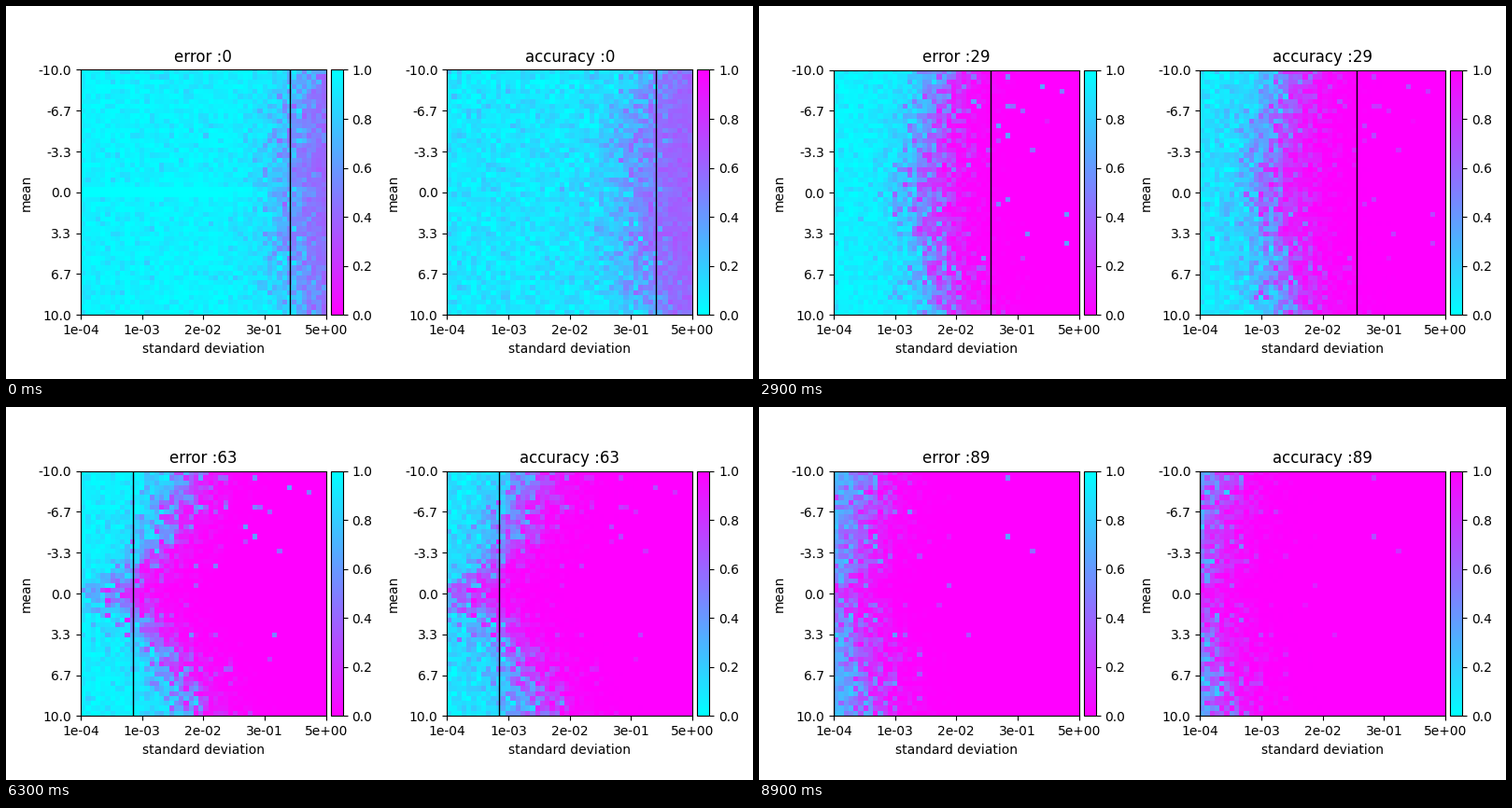
Animation of 800x400 px, one loop 9000 ms. Source, as a matplotlib script:

```python
import numpy as np
import matplotlib.pyplot as plt
from matplotlib.animation import FuncAnimation
from mpl_toolkits.axes_grid1 import make_axes_locatable

N = 50                # cells per side
EPOCHS = 90
STAGE = 10            # epochs per noise level
LOW, HIGH = 1e-4, 5.0
MARGINS = dict(left=.125, right=.9, bottom=.11, top=.88, wspace=.2)

plt.rcParams["font.family"] = "DejaVu Sans"
cols = np.arange(N)[None, :]
rows = np.abs(np.linspace(-1, 1, N))[:, None]

rng = np.random.default_rng(7)
hardness = rng.normal(size=(N, N))
chance = rng.random((N, N))
failure = rng.uniform(.05, .65, (N, N))


def sigmoid(z):
    return 1 / (1 + np.exp(-z))


def learned_edge(n):
    """Column where each row turns from unlearned to learned."""
    front = max(29 - .39 * n, -1) + 12 * np.exp(-n / 4)
    relapse = np.exp(-((n - 63) / 9) ** 2)
    bow = 4 + .04 * n + 11 * relapse
    power = np.interp(n, [45, 63], [2, .6])
    return front + bow * rows ** power


def fields(n):
    """Error and accuracy maps for one epoch."""
    r = np.random.default_rng(100 + n)
    dist = cols - learned_edge(n)
    jitter = .75 * hardness + .7 * r.normal(size=(N, N))
    depth = 1 - .4 * np.exp(-n / 2)
    top = np.interp(n, [63, 79], [1, .85])
    stray = failure * (chance < .15 * np.exp(-np.abs(dist) / 8))

    calm = (rows < .03) * np.exp(-n)
    grain = .07 * np.abs(r.normal(size=(N, N))) * (1 - calm)
    error = top * (1 - depth * sigmoid(dist / 2.8 - jitter)) * (1 - grain)
    error = np.maximum(error, stray)

    hit = depth * sigmoid((dist + 4) / 3 - jitter)
    hit = np.minimum(hit, 1 - stray / 2)
    accuracy = .1 + .9 * hit + .065 * r.normal(size=(N, N)) * (1 - hit)
    return error.clip(0, 1), accuracy.clip(0, 1)


def noise_level(n):
    """1, 0.3, 0.1, 0.03, ... one step per stage."""
    tens, odd = divmod(n // STAGE, 2)
    return (.3 if odd else 1) * 10.0 ** -tens


def add_map(ax, cmap):
    im = ax.imshow(np.zeros((N, N)), cmap=cmap, vmin=0, vmax=1,
                   interpolation="nearest")
    ax.set_xticks(np.linspace(-.5, N - .5, 5),
                  [f"{v:.0e}" for v in np.geomspace(LOW, HIGH, 5)])
    ax.set_yticks(np.linspace(-.5, N - .5, 7),
                  [f"{v:.1f}" for v in np.linspace(-10, 10, 7)])
    ax.set_xlabel("standard deviation")
    ax.set_ylabel("mean")
    line = ax.axvline(0, color="black", lw=1)
    cax = make_axes_locatable(ax).append_axes("right", size="5%", pad=.05)
    fig.colorbar(im, cax=cax)
    return ax, im, line


fig, (left, right) = plt.subplots(1, 2, figsize=(8, 4), dpi=100)
panels = [("error", *add_map(left, "cool_r")),
          ("accuracy", *add_map(right, "cool"))]


def settle(n):
    """The tight layout takes a few passes to come to rest."""
    if n == 0:
        fig.subplots_adjust(**MARGINS)
        fig.tight_layout()
    if n < 4:
        fig.tight_layout()


def update(n):
    x = N * np.log(noise_level(n) / LOW) / np.log(HIGH / LOW) - .5
    for (name, ax, im, line), data in zip(panels, fields(n)):
        im.set_data(data)
        line.set_xdata([x, x])
        ax.set_title(f"{name} :{n}")
    settle(n)
    return []


anim = FuncAnimation(fig, update, frames=EPOCHS, interval=100,
                     repeat=True, repeat_delay=0, blit=False)
plt.show()
```
